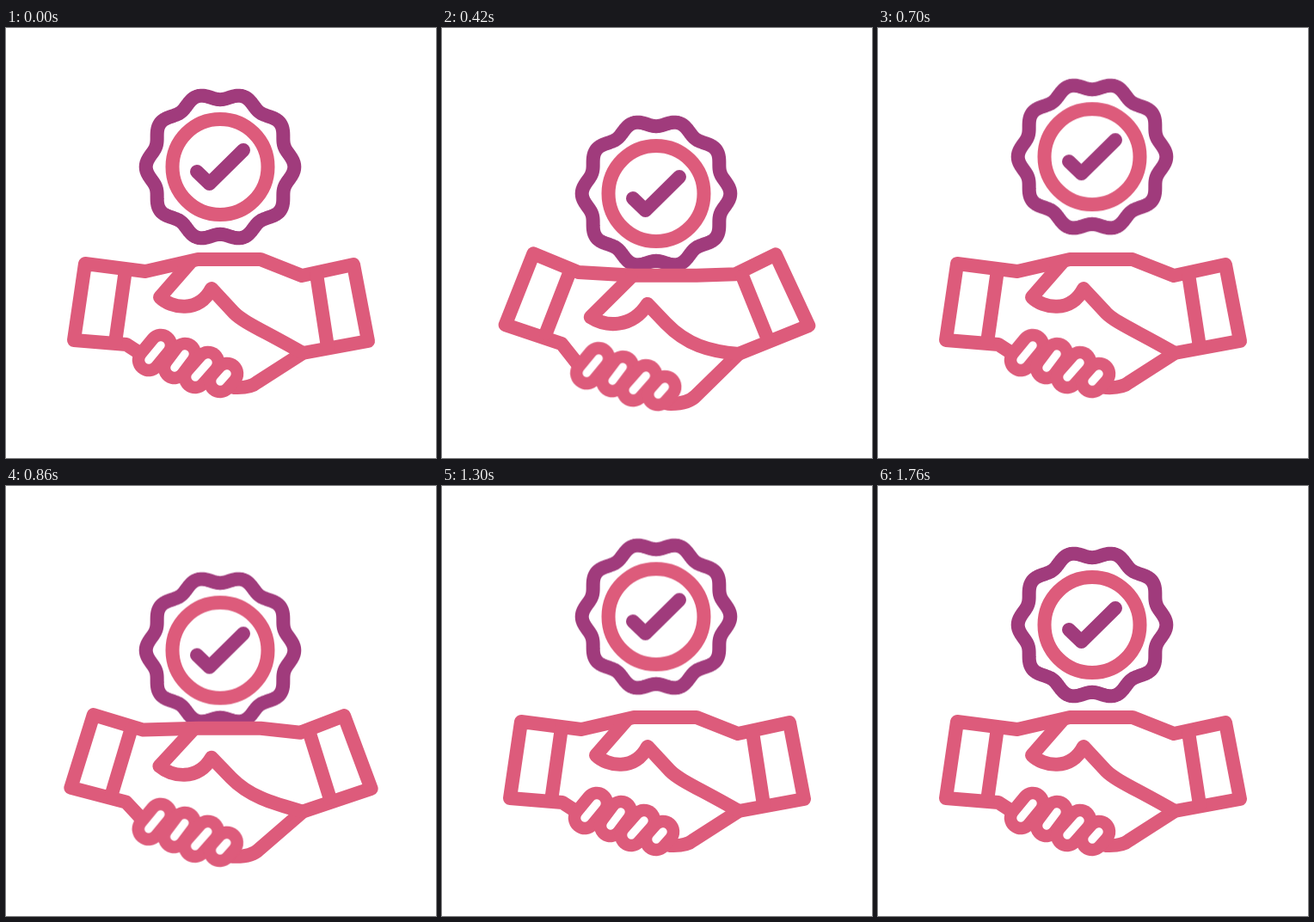
An HTML page for the animation above (2 s loop, 500x500 px).

```html
<!DOCTYPE html>
<html lang="en">
<head>
<meta charset="utf-8">
<title>Handshake</title>
<style>
  html, body { margin: 0; width: 100%; height: 100%; overflow: hidden; background: #fff; }
  svg { display: block; width: 100vw; height: 100vh; }
  path, circle, line { fill: none; stroke-width: 16; stroke-linecap: round; stroke-linejoin: round; }
  .pink { stroke: #dd5b7b; }
  .plum { stroke: #a03b7c; }
  .filled { fill: #fff; }
  .knuckle line { stroke-width: 38.5; }
  .gap line { stroke: #fff; stroke-width: 9.5; }

  #badge, #arms, #cuffs, #thumb, #fingers {
    animation: 2s cubic-bezier(.36, 0, .64, 1) infinite;
  }
  #badge { animation-name: bounce; }
  #arms { animation-name: arms; }
  #cuffs { animation-name: cuffs; }
  #thumb { animation-name: thumb; }
  #fingers { animation-name: fingers; }

  @keyframes bounce {
    0%, 88%, 100% { transform: translateY(0); }
    17.25% { transform: translateY(47px); }
    29.75% { transform: translateY(-28px); }
    45% { transform: translateY(32px); }
    59% { transform: translateY(-17px); }
    77% { transform: translateY(12px); }
  }
  @keyframes arms {
    0%, 34.5%, 65%, 100% {
      d: path("M157 379 L140 368 L79 363 L92 274 L162 283 L223 269 L296 269 L344 288 L404 275 L421 364 L345 378 L292 412 Q284 419 265 418");
    }
    17.5%, 49.5% {
      d: path("M157 391 L139 367 L73 343 L108 261 L158 284 L223 290 L296 290 L341 286 L386 262 L427 344 L345 379 L296 429 Q286 440 262 439");
    }
  }
  @keyframes cuffs {
    0%, 34.5%, 65%, 100% { d: path("M139 281 L127 366 M361 286 L374 371"); }
    17.5%, 49.5% { d: path("M150 283 L120 354 M348 289 L378 357"); }
  }
  @keyframes thumb {
    0%, 34.5%, 65%, 100% {
      d: path("M214 273 L179 313 C192 326 224 332 239 303 L265 331 C277 343 300 352 345 378");
    }
    17.5% {
      d: path("M220 292 L172 339 C190 350 220 352 239 323 L260 345 C285 371 312 379 345 379");
    }
    49.5% {
      d: path("M218 292 L178 334 C192 345 222 352 239 324 L260 345 C285 371 312 379 345 379");
    }
  }
  @keyframes fingers {
    0%, 34.5%, 65%, 100% { transform: translate(0, 0); }
    17.5% { transform: translate(2.5px, 17px); }
    49.5% { transform: translate(-.5px, 21px); }
  }
</style>
</head>
<body>
<svg viewBox="0 0 500 500">
  <g id="badge">
    <path id="seal" class="plum"/>
    <circle class="pink" cx="249" cy="161.5" r="55.5"/>
    <path class="plum" d="M222 167 L236.500 181 L276 142"/>
  </g>
  <path id="arms" class="pink filled"/>
  <path id="cuffs" class="pink"/>
  <path id="thumb" class="pink"/>
  <g id="fingers">
    <g id="knuckles" class="pink knuckle">
      <line x1="180" y1="369" x2="166" y2="386"/>
      <line x1="208" y1="379" x2="196" y2="395"/>
      <line x1="235" y1="389" x2="220" y2="406"/>
      <line x1="257" y1="402" x2="249" y2="411"/>
    </g>
    <g id="gaps" class="gap"></g>
  </g>
</svg>
<script>
  const byId = id => document.getElementById(id);

  // Ten-lobed seal around the badge centre
  const points = Array.from({ length: 240 }, (_, i) => {
    const a = i / 240 * 2 * Math.PI;
    const r = 82.3 + 4 * Math.cos(10 * a);
    return `${(249 + r * Math.cos(a)).toFixed(2)} ${(161.5 + r * Math.sin(a)).toFixed(2)}`;
  });
  byId('seal').setAttribute('d', `M${points.join('L')}Z`);

  // Each finger opening follows its knuckle
  for (const finger of byId('knuckles').children) byId('gaps').append(finger.cloneNode());
</script>
</body>
</html>
```
